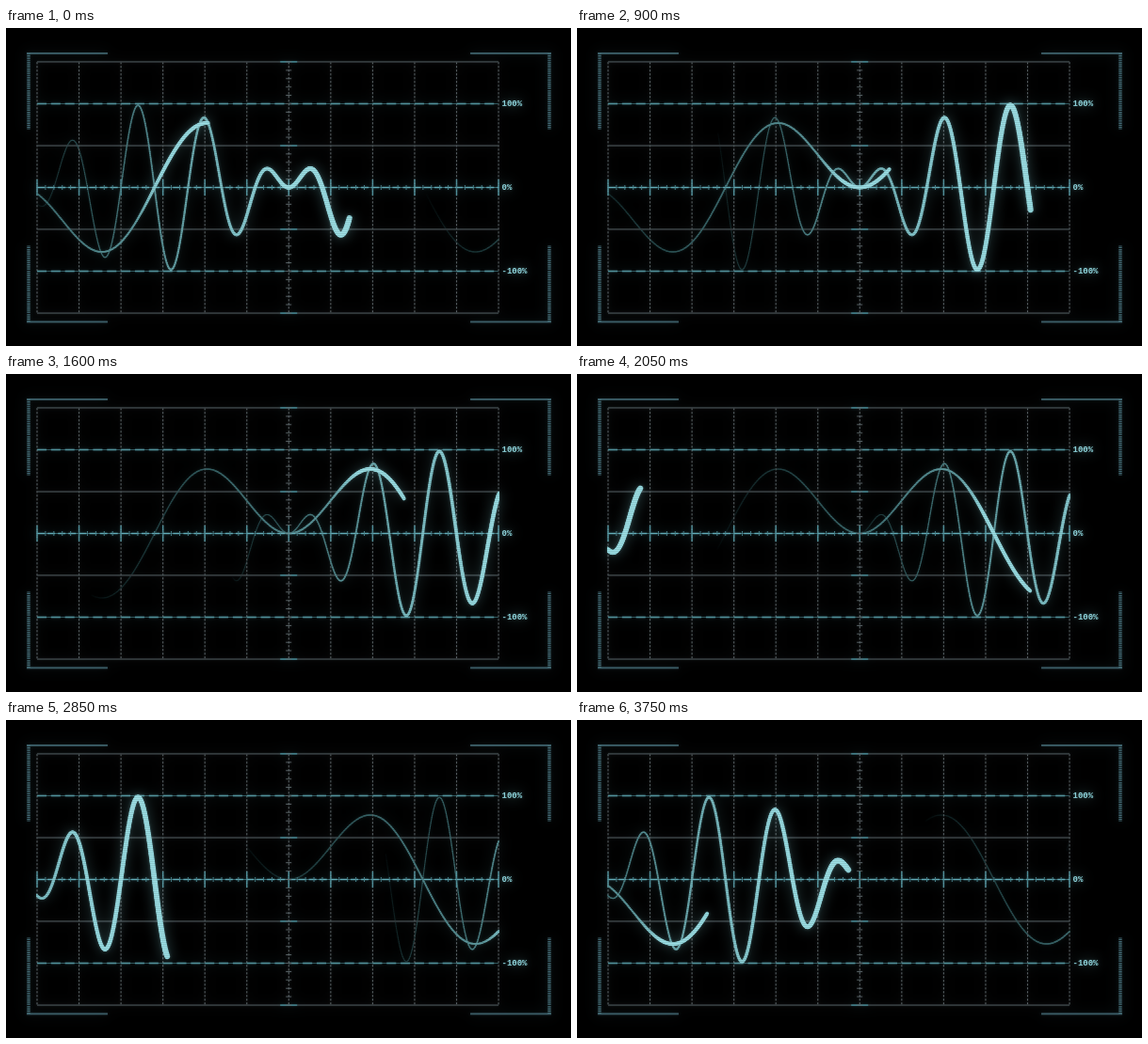
These frames come from a looping animation (600 by 338 pixels, 3.8 s). An HTML page with a canvas:

```html
<!DOCTYPE html>
<html lang="en">
<head>
<meta charset="utf-8">
<title>Oscilloscope</title>
<style>
  html, body { margin: 0; width: 100%; height: 100%; overflow: hidden; background: #000; }
  canvas { display: block; }
</style>
</head>
<body>
<canvas id="screen" width="600" height="338"></canvas>
<script>
const W = 600, H = 338;
const LOOP = 3800, STEP = 50;
const LEFT = 33, RIGHT = 523, TOP = 36, BOTTOM = 303, CELL = 44.55;
const CX = 300.2, CY = 169.5, AMP = 89, HALF_WAVE = 285;
const SPEED = 0.13, LAP = 564, TRAIL = 333;

const screen = document.getElementById('screen').getContext('2d');
const makeLayer = () => {
  const c = document.createElement('canvas');
  c.width = W;
  c.height = H;
  return c.getContext('2d');
};
const grid = makeLayer(), layer = makeLayer();

function line(x1, y1, x2, y2, color, width = 1, dash = []) {
  grid.strokeStyle = color;
  grid.lineWidth = width;
  grid.setLineDash(dash);
  grid.beginPath();
  grid.moveTo(x1, y1);
  grid.lineTo(x2, y2);
  grid.stroke();
}

function drawGrid() {
  const grey = '#394043', teal = '#39727d', cyan = '#58a2ae', bracket = '#3c616b';
  grid.fillStyle = '#000';
  grid.fillRect(0, 0, W, H);

  for (let i = 0; i <= 11; i++) {
    const x = LEFT + i * CELL;
    line(x, TOP, x, BOTTOM, '#535b5e', 1.1, [2.4, 1.6]);
    line(x, CY - 8.5, x, CY + 8.5, '#4d909c', 1.4);
  }
  for (let i = 0; i <= 6; i += 2) {
    const y = TOP + i * 44.5;
    line(LEFT, y, RIGHT, y, grey, 1.4);
    line(CX - 9, y, CX + 9, y, teal, 1.8);
  }
  for (const y of [80.5, 258.5]) {
    line(LEFT, y, RIGHT, y, '#315a62', 1.2);
    line(LEFT, y, RIGHT, y, cyan, 1.6, [10, 4.85]);
  }
  line(LEFT, CY, RIGHT, CY, '#315a62', 1.2);
  line(LEFT, CY, RIGHT, CY, cyan, 1.5, [8, 3.1]);
  for (let x = LEFT; x <= RIGHT + 1; x += CELL / 5) line(x, CY - 2.5, x, CY + 2.5, '#427983');
  for (let y = TOP; y <= BOTTOM + 1; y += 8.9) line(CX - 3, y, CX + 3, y, '#565f63');

  // Corner brackets
  for (const [x, dx] of [[22, 1], [579, -1]]) {
    for (const [y, dy] of [[26.8, 1], [312.3, -1]]) {
      line(x, y, x + 86 * dx, y, bracket, 1.8);
      line(x + 2 * dx, y, x + 2 * dx, y + 81 * dy, bracket, 3.4, [1.5, 0.8]);
    }
  }

  grid.fillStyle = '#8ddde6';
  grid.font = 'bold 9px "Liberation Mono", monospace';
  grid.textBaseline = 'middle';
  ['100%', '0%', '-100%'].forEach((label, i) => grid.fillText(label, 526.5, 81.2 + i * 89));
}

function waveY(x, harmonic) {
  const a = (x - CX) / HALF_WAVE * Math.PI;
  return CY - AMP * Math.sin(a) * Math.sin(harmonic * a);
}

function drawTrace(t, start, harmonic, style) {
  const head = LEFT + (start + SPEED * t) % LAP;
  for (let s = TRAIL; s > 0; s--) {
    let x = head - s;
    if (x < LEFT - 1) x += LAP;
    if (x > RIGHT) continue;
    const [width, light] = style(1 - s / TRAIL, s);
    layer.strokeStyle = `rgb(${132 * light ** 1.2} ${208 * light} ${216 * light})`;
    layer.lineWidth = width;
    layer.beginPath();
    layer.moveTo(x, waveY(x, harmonic));
    layer.lineTo(x + 1, waveY(x + 1, harmonic));
    layer.stroke();
  }
}

const fastStyle = k => [1 + 5 * k ** 2, Math.min(1, 1.15 * k ** 0.6)];
const slowStyle = (k, s) => {
  const boost = Math.max(0, Math.min(1, (78 - s) / 30));
  return [1 + 1.2 * k + 1.7 * boost, Math.min(1, 0.8 * k ** 0.7 + 0.3 * boost)];
};

function render(t) {
  layer.globalCompositeOperation = 'copy';
  layer.drawImage(grid.canvas, 0, 0);
  layer.globalCompositeOperation = 'lighten';
  layer.lineCap = 'round';
  layer.save();
  layer.beginPath();
  layer.rect(LEFT - 1, 0, RIGHT - LEFT + 2, H);
  layer.clip();
  drawTrace(t, 181.7, 2, slowStyle);
  drawTrace(t, 331.7, 8, fastStyle);
  layer.restore();

  // Scanlines, then bloom
  layer.globalCompositeOperation = 'source-over';
  layer.fillStyle = 'rgba(0, 0, 0, 0.16)';
  for (let y = 0; y < H; y += 2) layer.fillRect(0, y, W, 1);

  screen.globalCompositeOperation = 'copy';
  screen.filter = 'blur(0.6px)';
  screen.drawImage(layer.canvas, 0, 0);
  screen.globalCompositeOperation = 'screen';
  for (const [radius, alpha] of [[1.5, 0.32], [7, 0.45]]) {
    screen.filter = `blur(${radius}px)`;
    screen.globalAlpha = alpha;
    screen.drawImage(layer.canvas, 0, 0);
  }
  screen.globalAlpha = 1;
}

function tick() {
  const t = performance.now() % LOOP;
  render(Math.floor(t / STEP) * STEP);
  requestAnimationFrame(tick);
}

drawGrid();
tick();
</script>
</body>
</html>
```
